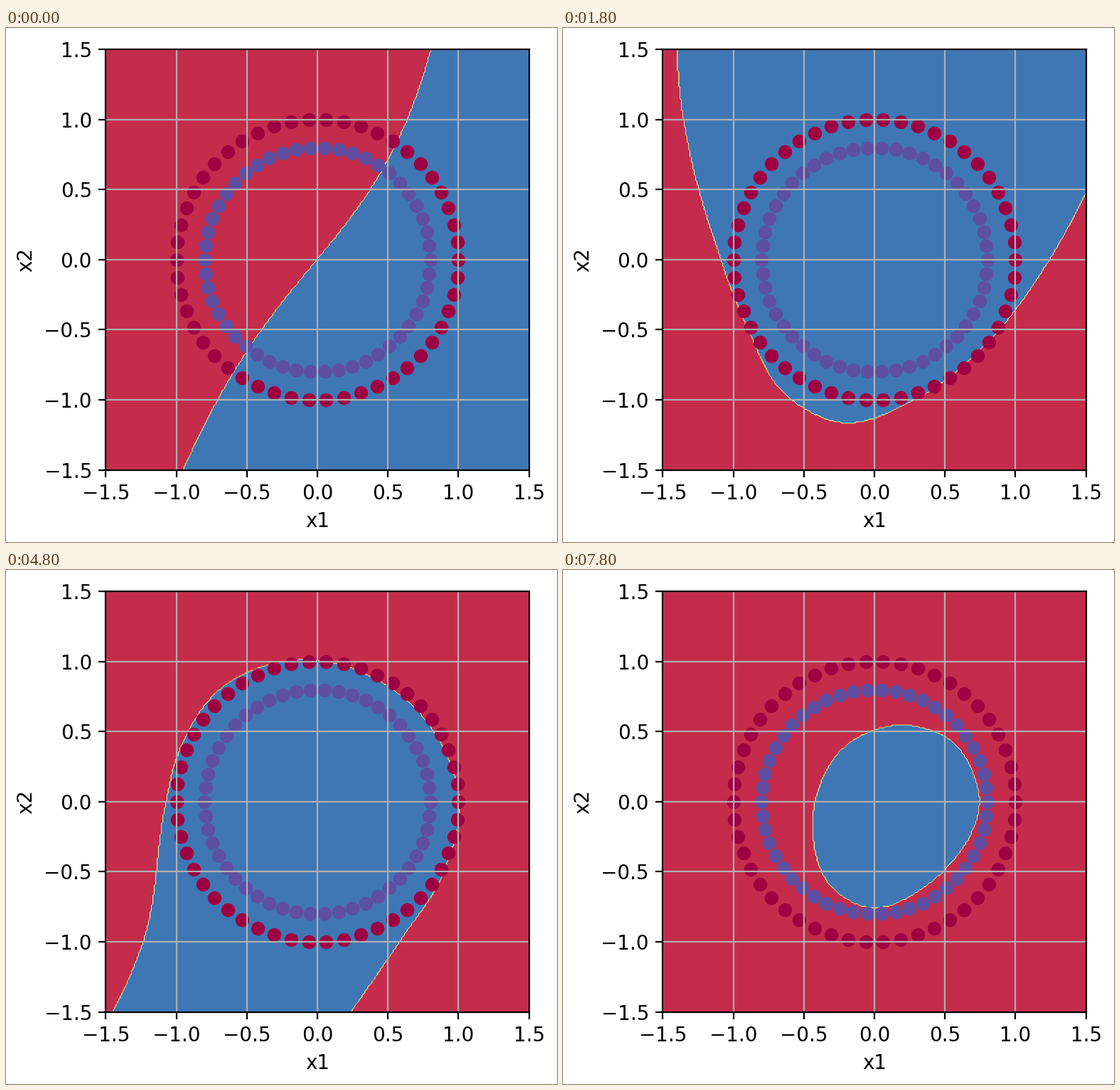
A matplotlib script for the animation above (8 s loop, 775x723 px).

```python
import numpy as np
import matplotlib.pyplot as plt
from matplotlib.animation import FuncAnimation
from matplotlib.path import Path

W, H, DPI = 775, 723, 200
STEP, LOOP = 200, 8000
LEFT, TOP, AX_W, AX_H = 140.4, 30.25, 595.2, 591.36
LIM = 1.5

axis = np.linspace(-LIM, LIM, 301)
xx, yy = np.meshgrid(axis, axis)
nodes = np.column_stack([xx.ravel(), yy.ravel()])

# Key points of the decision boundaries, in data units
BOWL = [(-1.4, 1.5), (-1.35, 1), (-1.086, 0), (-.885, -.515), (-.643, -.947),
        (-.214, -1.163), (.265, -1.007), (.82, -.567), (1.247, .017),
        (1.5, .489)]
CUP = [(-.844, 1.5), (-.995, .99), (-1.006, .484), (-.915, 0), (-.72, -.556),
       (-.466, -.87), (-.214, -.942), (.113, -.866), (.542, -.566),
       (1.036, .23), (1.273, 1.5)]
BELL = [(-1.449, -1.5), (-1.232, -1), (-1.071, 0), (-.98, .357),
        (-.668, .819), (-.063, 1.012), (.34, .91), (.769, .575), (1.006, 0),
        (.88, -.53), (.577, -1), (.234, -1.5)]
DROP = [(-.804, 0), (-.769, .459), (-.466, .819), (0, .94), (.491, .748),
        (.844, .24), (.85, -.1), (.491, -.597), (0, -.916), (-.34, -1.13),
        (-.471, -1.155), (-.542, -.926), (-.693, -.44)]
TIP = [(-.804, -1.5), (-.517, -1.287), (-.466, -1.317), (-.426, -1.5)]
EGG = [(-.436, -.115), (-.29, -.62), (-.038, -.754), (.39, -.58),
       (.743, .017), (.542, .433), (.19, .545), (-.19, .408)]


def scaled(pts, sx, sy, cx=0):
    return (np.array(pts) - (cx, 0)) * (sx, sy) + (cx, 0)


def smooth(pts, closed=False, n=7):
    """Cubic Hermite curve, parametrised by chord length."""
    p = np.array(pts, float)
    if closed:
        p = np.vstack([p[-2:], p, p[:3]])
    s = np.append(0, np.cumsum(np.hypot(*np.diff(p, axis=0).T)))
    m = np.gradient(p, s, axis=0, edge_order=2)
    if closed:
        p, s, m = p[2:-2], s[2:-2], m[2:-2]
    h = np.diff(s)[:, None, None]
    t = (np.arange(n) / n)[None, :, None]
    a, b, ma, mb = (v[:, None] for v in (p[:-1], p[1:], m[:-1], m[1:]))
    q = (a + (b - a) * t * t * (3 - 2 * t)
         + h * t * (1 - t) * (ma * (1 - t) - mb * t))
    q = q.reshape(-1, 2)
    return q if closed else np.vstack([q, p[-1]])


def opened(pts, reach=3):
    """Smooth curve with both ends carried straight on past the axes."""
    c = smooth(pts)
    ends = [a + (a - b) * reach / np.hypot(*(a - b))
            for a, b in ((c[0], c[1]), (c[-1], c[-2]))]
    return np.vstack([ends[0], c, ends[1]])


def region(outline):
    """Signed distance to a closed outline, positive inside."""
    d2 = np.full(xx.shape, 1e9)
    for (x0, y0), (x1, y1) in zip(outline, np.roll(outline, -1, axis=0)):
        ux, uy = x1 - x0, y1 - y0
        gx, gy = xx - x0, yy - y0
        t = np.clip((gx * ux + gy * uy) / (ux * ux + uy * uy), 0, 1)
        d2 = np.minimum(d2, (gx - t * ux)**2 + (gy - t * uy)**2)
    inside = Path(outline).contains_points(nodes).reshape(xx.shape)
    return np.minimum(np.sqrt(d2), 1.25) * np.where(inside, 1, -1)


def diagonal(shift=0):
    """Everything to the right of a bent, steep line."""
    y = np.linspace(3, -3, 60)
    x = .59 * np.arcsinh(1.4 * y) - .032 * y**2 + shift
    return region(np.vstack([np.column_stack([x, y]), (5, -3), (5, 3)]))


def corner():
    """Everything below a nearly straight line."""
    x = np.linspace(4, -3, 40)
    y = -1.22 + .9 * x - .03 * x**2
    return region(np.vstack([np.column_stack([x, y]), (4, -5)]))


drop = region(smooth(DROP, closed=True))
states = [
    (0, diagonal()),
    (1000, corner()),
    (1800, region(opened(BOWL))),
    (2400, region(opened(scaled(CUP, 1.235, 1.46, cx=.09)))),
    (3000, region(opened(CUP))),
    (4800, region(opened(BELL))),
    (5600, region(smooth(scaled(DROP, 1.47, 1.33), closed=True))),
    (6200, np.maximum(drop, region(opened(TIP)))),
    (7200, diagonal(shift=-.37)),
    (7800, region(smooth(EGG, closed=True))),
]


def classes(ms):
    """Predicted class, 0 or 1, blended between neighbouring states."""
    for (t0, f0), (t1, f1) in zip(states, states[1:]):
        if ms <= t1:
            k = (ms - t0) / (t1 - t0)
            return (f0 + k * (f1 - f0) > 0).astype(float)


fig = plt.figure(figsize=(W / DPI, H / DPI), dpi=DPI, facecolor="white")
ax = fig.add_axes([LEFT / W, 1 - (TOP + AX_H) / H, AX_W / W, AX_H / H])

cmap = plt.get_cmap("Spectral")
angle = np.arange(50) * 2 * np.pi / 50
for radius, shade in ((1.0, 0.0), (0.8, 1.0)):
    ax.scatter(radius * np.cos(angle), radius * np.sin(angle),
               color=[cmap(shade)], s=36)

ticks = np.arange(-3, 4) * 0.5
ax.set(xlim=(-LIM, LIM), ylim=(-LIM, LIM), xticks=ticks, yticks=ticks,
       xlabel="x1", ylabel="x2")
ax.grid(True)

levels = np.arange(8) * 0.15
shown = []


def draw(i):
    while shown:
        shown.pop().remove()
    shown.append(ax.contourf(xx, yy, classes(i * STEP), levels=levels,
                             cmap=cmap, zorder=0.5))
    return shown


anim = FuncAnimation(fig, draw, frames=LOOP // STEP, interval=STEP,
                     init_func=lambda: [], repeat=True, repeat_delay=0,
                     blit=False)
plt.show()
```
